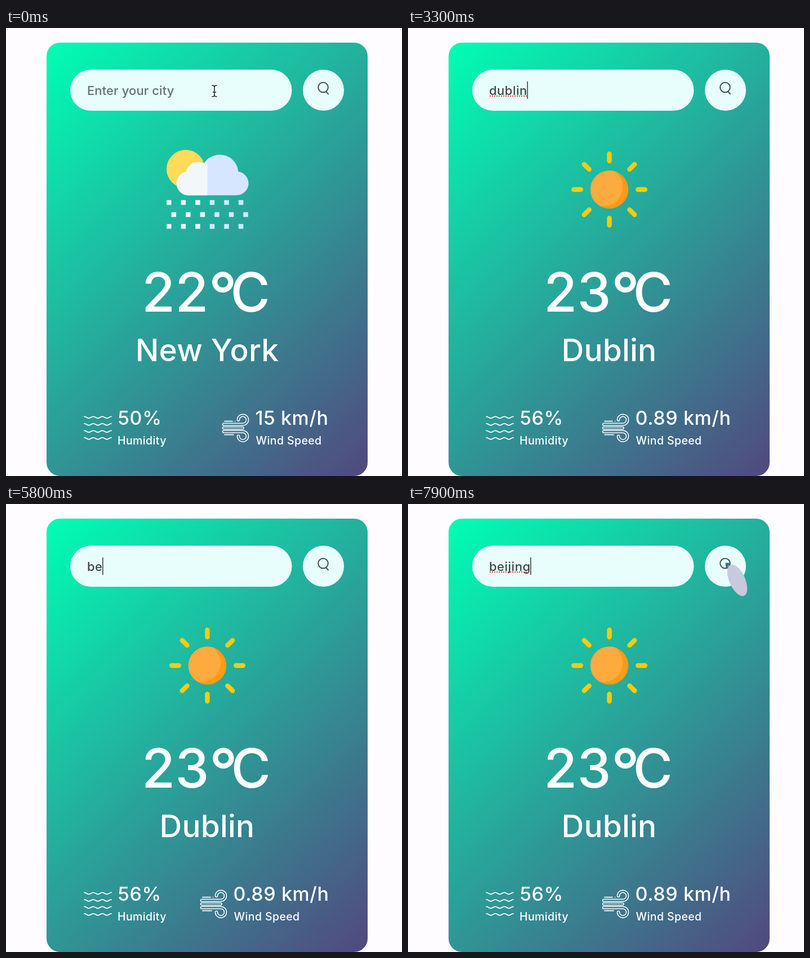
Recreate the animation shown at these times as an HTML page. Size 703 by 796 pixels, loop 8000 ms.

```html
<!DOCTYPE html>
<html lang="en">
<head>
<meta charset="utf-8">
<title>Weather</title>
<style>
  html, body { margin: 0; width: 100%; height: 100%; overflow: hidden; background: #fefcff; }
  .card {
    position: absolute; left: 72px; top: 25.5px; width: 570px; height: 770.5px;
    border-radius: 24px; background: linear-gradient(135deg, #00feb4, #52487f);
  }
  svg { position: absolute; left: 0; top: 0; }
  text { font-family: Inter, "Open Sans", sans-serif; fill: #fff; white-space: pre; }
  .temp { font-size: 96px; font-weight: 500; }
  .degree { font-size: 112px; letter-spacing: -12px; }
  .city { font-size: 55px; font-weight: 450; letter-spacing: .2px; text-anchor: middle; }
  .value { font-size: 34px; font-weight: 500; letter-spacing: .6px; }
  .label { font-size: 19.5px; font-weight: 500; letter-spacing: .4px; }
  .hint { font-size: 22px; font-weight: 450; fill: #667272; letter-spacing: .1px; }
  .typed { font-size: 22px; font-weight: 500; fill: #3f4747; letter-spacing: .5px; }
  .line { fill: none; stroke: #fff; stroke-width: 1.7; stroke-linecap: round; }
  .tube { fill: none; stroke-linecap: round; }
</style>
</head>
<body>
<div class="card"></div>
<svg width="703" height="796" viewBox="0 0 703 796">
  <defs>
    <clipPath id="leftHalf"><rect x="280" y="210" width="77.5" height="160"/></clipPath>
    <clipPath id="disk"><circle cx="357.5" cy="287" r="33.7"/></clipPath>
    <g id="tubes" class="tube">
      <path d="M386.5 704.2H420.5a8 8 0 1 0-8-8"/>
      <path d="M386.5 710.7H420"/>
      <path d="M386.5 717.2H420.5a8 8 0 1 1-8 8"/>
    </g>
    <mask id="hollow" maskUnits="userSpaceOnUse" x="375" y="680" width="65" height="62">
      <use href="#tubes" stroke="#fff" stroke-width="5.6"/>
      <use href="#tubes" stroke="#000" stroke-width="2.6"/>
    </mask>
    <g id="cloud">
      <circle cx="324" cy="276" r="21.3"/>
      <circle cx="340.5" cy="259" r="21"/>
      <circle cx="379.5" cy="258" r="33"/>
      <circle cx="409.5" cy="276" r="21"/>
      <path d="M324 262H409.5V297.2H324z"/>
    </g>
    <path id="beamShape" d="M-4-10Q0-10 0-7V7Q0 10-4 10M4-10Q0-10 0-7M0 7Q0 10 4 10M-2.5 2H2.5"/>
  </defs>

  <!-- search row -->
  <rect x="114" y="74" width="393.5" height="73" rx="36.5" fill="#e7fefc"/>
  <circle cx="563.5" cy="110.5" r="36.5" fill="#e7fefc"/>
  <g fill="none" stroke="#465252" stroke-width="2" stroke-linecap="round">
    <circle cx="563" cy="105.5" r="8.8"/>
    <path d="M567.8 112.8L572 117.3"/>
  </g>
  <rect id="pick" x="144" y="94" height="34" fill="#bfe5bd"/>
  <text id="hint" class="hint" x="144" y="118.5">Enter your city</text>
  <text id="typed" class="typed" x="144" y="118.5"></text>
  <line id="spell" x1="146" stroke="#dc4630" stroke-linecap="round" stroke-dasharray="0 4"/>
  <rect id="caret" y="95" width="1.6" height="31" fill="#3f4747"/>

  <g id="rainIcon">
    <circle cx="319" cy="250.5" r="34" fill="#ffdb5a"/>
    <use href="#cloud" fill="#d6e6fe"/>
    <use href="#cloud" fill="#f2f7f9" clip-path="url(#leftHalf)"/>
    <g id="drops"></g>
  </g>
  <g id="sunIcon">
    <circle cx="357.5" cy="287" r="33.7" fill="#ff9a14"/>
    <circle cx="346" cy="282" r="35" fill="#fdaa3e" clip-path="url(#disk)"/>
    <g id="rays" stroke="#fdcb0a" stroke-width="8.4" stroke-linecap="round"></g>
  </g>

  <text class="temp" x="241" y="503.5"><tspan id="temp"></tspan><tspan class="degree" dy="11">°</tspan><tspan dy="-11">C</tspan></text>
  <text id="city" class="city" x="357" y="591.5"></text>

  <g id="waves" class="line"></g>
  <text id="humid" class="value" x="198.5" y="705"></text>
  <text class="label" x="198" y="740">Humidity</text>

  <g id="wind">
    <rect x="375" y="680" width="65" height="62" fill="#fff" mask="url(#hollow)"/>
    <path class="line" d="M388 698.6H402M406.5 698.6h.1M388 722.7H404"/>
    <text id="speed" class="value" x="442.5" y="705"></text>
    <text class="label" x="443.5" y="740">Wind Speed</text>
  </g>

  <g id="beam" fill="none" stroke-linecap="round">
    <use href="#beamShape" stroke="#fff" stroke-width="3.2"/>
    <use href="#beamShape" stroke="#222" stroke-width="1.6"/>
  </g>
  <g id="pointer">
    <path d="M0 0L10 0L1 10z" fill="#2f7584"/>
    <ellipse cx="21" cy="31" rx="14" ry="30" transform="rotate(-24 21 31)" fill="#c8c9de"/>
  </g>
</svg>
<script>
const LOOP = 8000;
const $ = id => document.getElementById(id);
const show = (id, on) => $(id).style.display = on ? '' : 'none';
const setText = (id, s) => { if ($(id).textContent !== s) $(id).textContent = s; };

// Static repeated parts
let drops = '';
[310, 331.5, 352.5].forEach((y, row) => {
  for (let i = 0; i < 6; i++) {
    const x = 289.3 + (row === 1 ? 8.5 : 0) + i * 25.55;
    drops += `<rect x="${x - 4.25}" y="${y - 4.25}" width="8.5" height="8.5" fill="${x < 357 ? '#f2f7f9' : '#d6e6fe'}"/>`;
  }
});
$('drops').innerHTML = drops;

$('rays').innerHTML = [...Array(8).keys()].map(i =>
  `<path d="M357.5 223.7V236.3" transform="rotate(${i * 45} 357.5 287)"/>`).join('');

$('waves').innerHTML = [690.3, 702.8, 715.3, 727.8].map(y =>
  `<path d="M139 ${y}${'c4 0 4 3 8 3s4-3 8-3'.repeat(3)}"/>`).join('');

// Times of the key presses and of the spelling mark
const words = [
  { text: 'dublin', keys: [1100, 1300, 1500, 1600, 1800, 1900], spell: 2600 },
  { text: 'beijing', keys: [5400, 5700, 5900, 6100, 6200, 6400, 6600], spell: 7300 }
];
const FOCUS = 500, RESULT = 2700, PICK = 4400, BACK = 3800, OUT = 7300;
const places = [
  { temp: '22', city: 'New York', humid: '50%', speed: '15 km/h', shift: 0 },
  { temp: '23', city: 'Dublin', humid: '56%', speed: '0.89 km/h', shift: -39 }
];

const ease = p => { p = Math.min(1, Math.max(0, p)); return p * p * (3 - 2 * p); };
const mix = (a, b, p) => a + (b - a) * p;

function drawSearch(t) {
  const word = words[t < words[1].keys[0] ? 0 : 1];
  const pressed = word.keys.filter(k => k <= t);
  const picked = t >= PICK && t < words[1].keys[0];
  setText('typed', word.text.slice(0, pressed.length));
  const width = pressed.length ? $('typed').getComputedTextLength() : 0;

  show('hint', !pressed.length);
  show('pick', picked);
  $('pick').setAttribute('width', width);

  show('spell', t >= word.spell);
  const spell = $('spell'), y = picked ? 122.7 : 121;
  spell.setAttribute('x2', 143 + width);
  spell.setAttribute('y1', y);
  spell.setAttribute('y2', y);
  spell.setAttribute('stroke-width', picked ? 3.2 : 2.3);

  const last = pressed.length ? pressed[pressed.length - 1] : FOCUS;
  show('caret', t >= FOCUS && !picked && (t - last) % 1000 < 500);
  $('caret').setAttribute('x', 143.5 + width);
}

function drawResult(t) {
  const sunny = t >= RESULT;
  const place = places[sunny ? 1 : 0];
  ['temp', 'city', 'humid', 'speed'].forEach(k => setText(k, place[k]));
  show('rainIcon', !sunny);
  show('sunIcon', sunny);
  $('wind').setAttribute('transform', `translate(${place.shift} 0)`);
}

function drawMouse(t) {
  const back = ease((t - BACK) / 500), out = ease((t - OUT) / 500);
  const x = mix(mix(370, 320.5, back), 563.5, out);
  const y = mix(mix(112, 108, back), 104.5, out);
  const shown = t < words[0].keys[0] || (t >= BACK && t < words[1].keys[0]) || t >= OUT;
  const inField = x < 507;
  show('beam', shown && inField);
  show('pointer', shown && !inField);
  const move = `translate(${x} ${y})`;
  $('beam').setAttribute('transform', move);
  $('pointer').setAttribute('transform', move);
}

const start = performance.now();
function frame(now) {
  const t = Math.floor(Math.max(0, now - start) % LOOP / 100) * 100;
  drawSearch(t);
  drawResult(t);
  drawMouse(t);
  requestAnimationFrame(frame);
}
frame(start);
</script>
</body>
</html>
```
